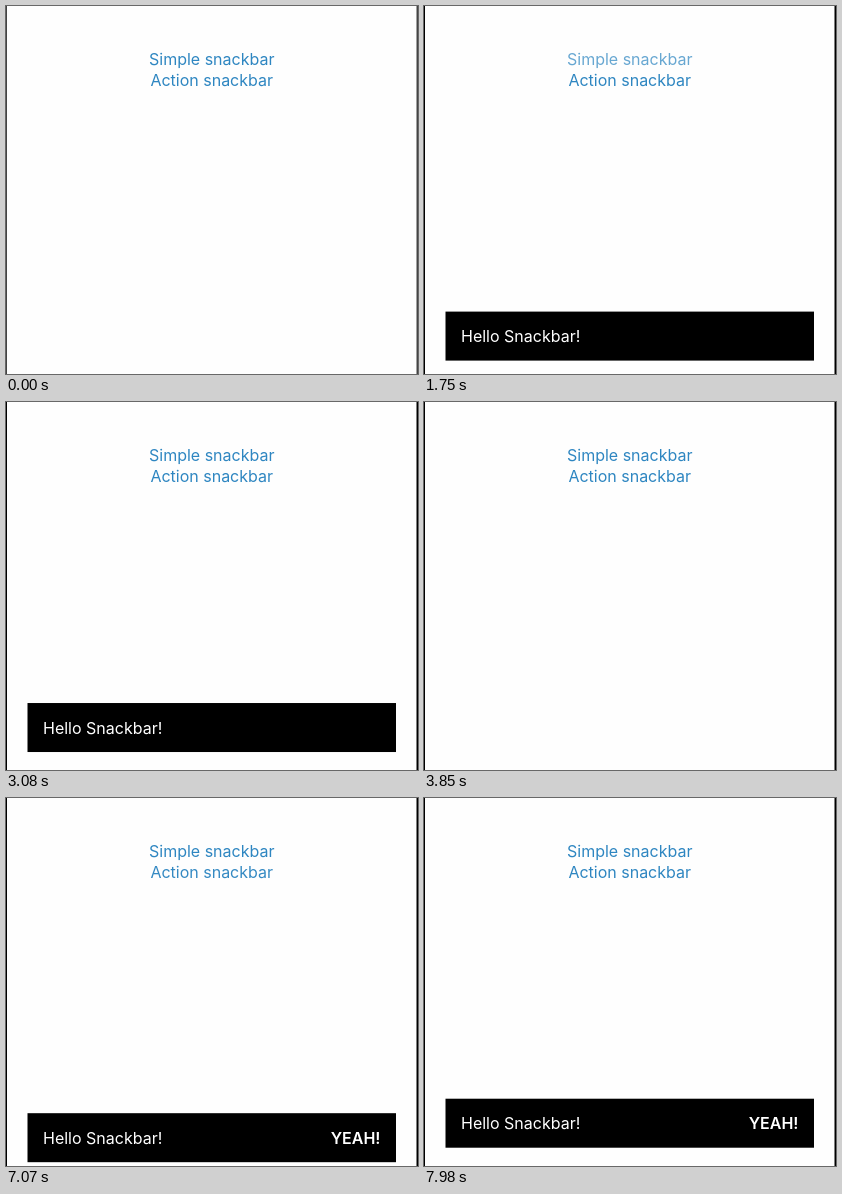
Animation, 412 px wide and 368 px high, one loop 8000 ms. Source, as an HTML page:

```html
<!DOCTYPE html>
<html lang="en">
<head>
<meta charset="utf-8">
<title>Snackbar demo</title>
<style>
  html, body { margin: 0; width: 100%; height: 100%; overflow: hidden; background: #fff; }
  svg { display: block; width: 412px; height: 368px; font: 16px Inter, sans-serif; }
  .link { fill: #2e86c1; text-anchor: middle; }
  .bar text { fill: #fff; }
  .action { font-weight: 600; text-anchor: end; }
</style>
</head>
<body>
<svg viewBox="0 0 412 368">
  <rect width="412" height="368" fill="#fefefe"/>
  <g id="edges">
    <rect width="1" height="368"/>
    <rect x="410.5" width="1.5" height="368"/>
  </g>
  <text class="link" id="simple" x="205.7" y="59">Simple snackbar</text>
  <text class="link" id="action" x="205.7" y="80">Action snackbar</text>
  <g class="bar" id="bar">
    <rect x="21.5" width="368.5" height="49"/>
    <text x="37" y="30.5">Hello Snackbar!</text>
    <text class="action" id="label" x="374.5" y="30.5">YEAH!</text>
  </g>
</svg>
<script>
const LOOP = 8000;
const REST_Y = 301, HIDDEN_Y = 368;
const SIMPLE = { press: 1500, show: 1530, hide: 3540 };
const ACTION = { press: 6750, show: 6885 };
const FADE = 300;

const $ = id => document.getElementById(id);
const edges = $('edges'), simple = $('simple'), action = $('action'), bar = $('bar'), label = $('label');
const clamp = v => Math.min(1, Math.max(0, v));
const smooth = v => { const p = clamp(v); return p * p * (3 - 2 * p); };

// Remaining distance of a spring with stiffness 100, damping 10, mass 1.
function spring(ms) {
  const t = ms / 1000, w = Math.sqrt(75);
  return Math.exp(-5 * t) * (Math.cos(w * t) + 5 / w * Math.sin(w * t));
}

// Touch feedback: dim while pressed, then recover.
function touchOpacity(ms) {
  if (ms < 0) return 1;
  return ms < 100 ? 1 - 0.8 * smooth(ms / 90) : 0.2 + 0.8 * smooth((ms - 100) / 250);
}

function draw(t) {
  const withAction = t >= ACTION.show;
  const start = withAction ? ACTION.show : SIMPLE.show;
  const opacity = t < start ? 0 : withAction ? 1 : 1 - smooth((t - SIMPLE.hide) / FADE);
  const y = REST_Y + (HIDDEN_Y - REST_Y) * spring(Math.max(0, t - start));

  edges.setAttribute('fill', t < 1540 ? '#444' : '#000');
  simple.setAttribute('opacity', touchOpacity(t - SIMPLE.press));
  action.setAttribute('opacity', touchOpacity(t - ACTION.press));
  bar.setAttribute('opacity', opacity);
  bar.setAttribute('transform', `translate(0 ${y.toFixed(2)})`);
  label.setAttribute('visibility', withAction ? 'visible' : 'hidden');
}

const origin = performance.now();
function frame() {
  draw((performance.now() - origin) % LOOP);
  requestAnimationFrame(frame);
}
frame();
</script>
</body>
</html>
```
